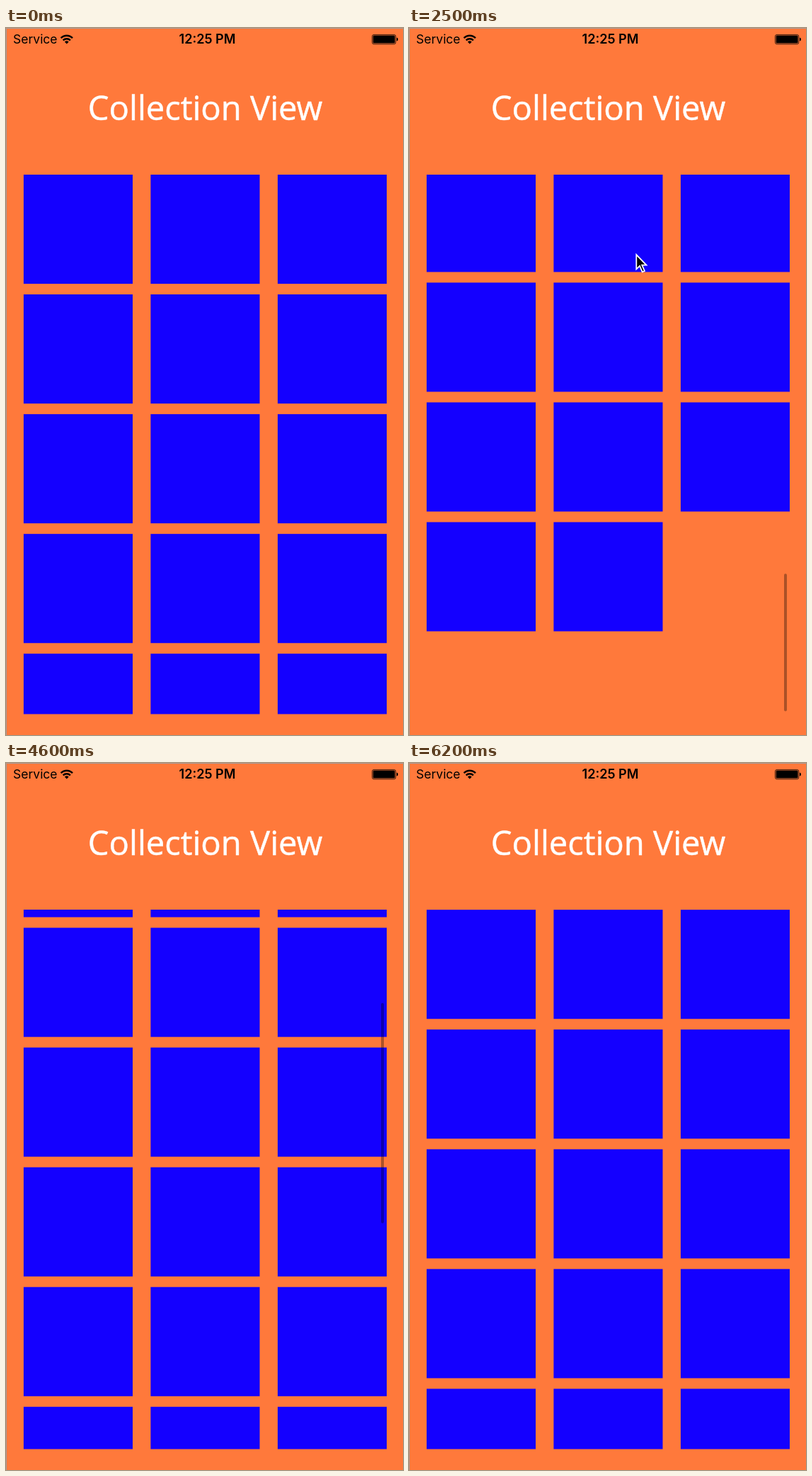
An HTML page that plays this animation: 561 px wide and 998 px high, repeating every 7200 ms.

```html
<!DOCTYPE html>
<html lang="en">
<head>
<meta charset="utf-8">
<title>Collection View</title>
<style>
  html, body { margin: 0; width: 100%; height: 100%; overflow: hidden; background: #ff793b; }
  svg { display: block; width: 100%; height: 100%; }
  .status { font: 400 17.5px Inter, sans-serif; }
  .clock { font-size: 18.1px; font-weight: 600; text-anchor: middle; }
  .title { font: 400 47.2px "Open Sans", sans-serif; fill: #fff; stroke: #fff; stroke-width: .5; text-anchor: middle; }
</style>
</head>
<body>
<svg viewBox="0 0 561 998">
  <defs>
    <clipPath id="viewport"><rect x="0" y="207" width="561" height="761.5"/></clipPath>
  </defs>
  <rect width="561" height="998" fill="#ff793b"/>
  <path d="M.5 998V.5H561" fill="none" stroke="#a99a96"/>

  <text class="status" x="10" y="22">Service</text>
  <g fill="none" stroke="#000" stroke-width="2.4">
    <path d="M77.6 14.2a11.4 11.4 0 0 1 16.4 0M80.7 17.3a7.2 7.2 0 0 1 10.2 0"/>
    <path d="M85.8 22.6l-2.9-3a4.2 4.2 0 0 1 5.8 0z" fill="#000" stroke="none"/>
  </g>
  <text class="status clock" x="284.5" y="22">12:25 PM</text>
  <rect x="517.4" y="9.4" width="33.4" height="13.4" rx="2.5" fill="none" stroke="#000" stroke-width=".75"/>
  <rect x="518.6" y="10.6" width="31" height="11" rx="1.4"/>
  <path d="M552 13.5q2 .4 2 2.5t-2 2.5z"/>

  <text class="title" x="281.5" y="130">Collection View</text>

  <g clip-path="url(#viewport)"><g id="cells" fill="#1400ff"></g></g>
  <rect id="bar" x="530" width="4" rx="2" fill="#000"/>
  <path id="cursor" d="M1.3 3V23.4L6 18.9L9.7 27.4L12.9 26L9.2 17.6H15.4Z" stroke="#fff" stroke-width="1.8"/>
</svg>
<script>
  const LOOP = 7200, STEP = 100;
  const TOP = 207, VIEW = 761.5, CELL = 154.1, PITCH = 169.05, COLUMN = 179.5, COUNT = 32;
  const CONTENT = Math.ceil(COUNT / 3) * PITCH - (PITCH - CELL);
  const MAX = CONTENT - VIEW;
  const TRACK = VIEW - 8;

  // Easings take progress and the duration in ms
  const linear = p => p;
  const smooth = p => p * p * (3 - 2 * p);
  const release = p => Math.sin(p * Math.PI / 2);
  const glide = (p, ms) => (1 - Math.exp(-p * ms / 500)) / (1 - Math.exp(-ms / 500));
  const settle = (p, ms) => {
    const x = p * ms * .0105;
    return 1 - (1 + x) * Math.exp(-x);
  };

  // Each key: time, easing on the way there, values
  const scrollKeys = [
    [200, linear, 0],
    [500, linear, 355],
    [1700, glide, 521],
    [2500, release, 1200],
    [3800, settle, MAX],
    [4200, linear, 624.4],
    [4900, glide, 197.7],
    [5400, smooth, -75.5],
    [6200, settle, 0]
  ];
  const pointerKeys = [
    [200, linear, 330, 800],
    [500, linear, 330, 445],
    [1700, smooth, 335, 868],
    [2500, release, 320, 317],
    [3400, linear, 336, 540],
    [3800, linear, 336, 540],
    [4200, linear, 341, 965]
  ];

  function tween(keys, t) {
    const next = keys.findIndex(key => key[0] >= t);
    if (next < 1) return keys.at(next).slice(2);
    const [start, , ...from] = keys[next - 1];
    const [end, ease, ...to] = keys[next];
    const p = ease((t - start) / (end - start), end - start);
    return from.map((v, i) => v + (to[i] - v) * p);
  }

  const clamp = (v, low, high) => Math.min(high, Math.max(low, v));
  const fade = (t, start, end) => clamp(Math.min(t - start, end - t) / 200, 0, 1);

  function setAttributes(element, values) {
    for (const name in values) element.setAttribute(name, values[name]);
  }

  const [cells, bar, cursor] = ["cells", "bar", "cursor"].map(id => document.getElementById(id));

  for (let i = 0; i < COUNT; i++) {
    const cell = document.createElementNS(cells.namespaceURI, "rect");
    setAttributes(cell, {
      x: 24.9 + (i % 3) * COLUMN,
      y: TOP + Math.floor(i / 3) * PITCH,
      width: CELL,
      height: CELL
    });
    cells.append(cell);
  }

  function drawBar(scroll, t) {
    const inside = clamp(scroll, 0, MAX);
    const full = TRACK * VIEW / CONTENT;
    const length = full - Math.abs(scroll - inside);
    const start = scroll > MAX ? TRACK - length : (TRACK - full) * inside / MAX;
    const opacity = .33 * (fade(t, 100, 3400) + fade(t, 3700, 6200));
    setAttributes(bar, { y: TOP + 4 + start, height: length, opacity });
  }

  function draw() {
    const t = Math.floor(performance.now() % LOOP / STEP) * STEP;
    const [scroll] = tween(scrollKeys, t);
    const [x, y] = tween(pointerKeys, t);
    setAttributes(cells, { transform: `translate(0 ${-scroll})` });
    setAttributes(cursor, {
      transform: `translate(${x} ${y})`,
      visibility: t >= 200 && t < 4200 ? "visible" : "hidden"
    });
    drawBar(scroll, t);
    requestAnimationFrame(draw);
  }
  draw();
</script>
</body>
</html>
```
